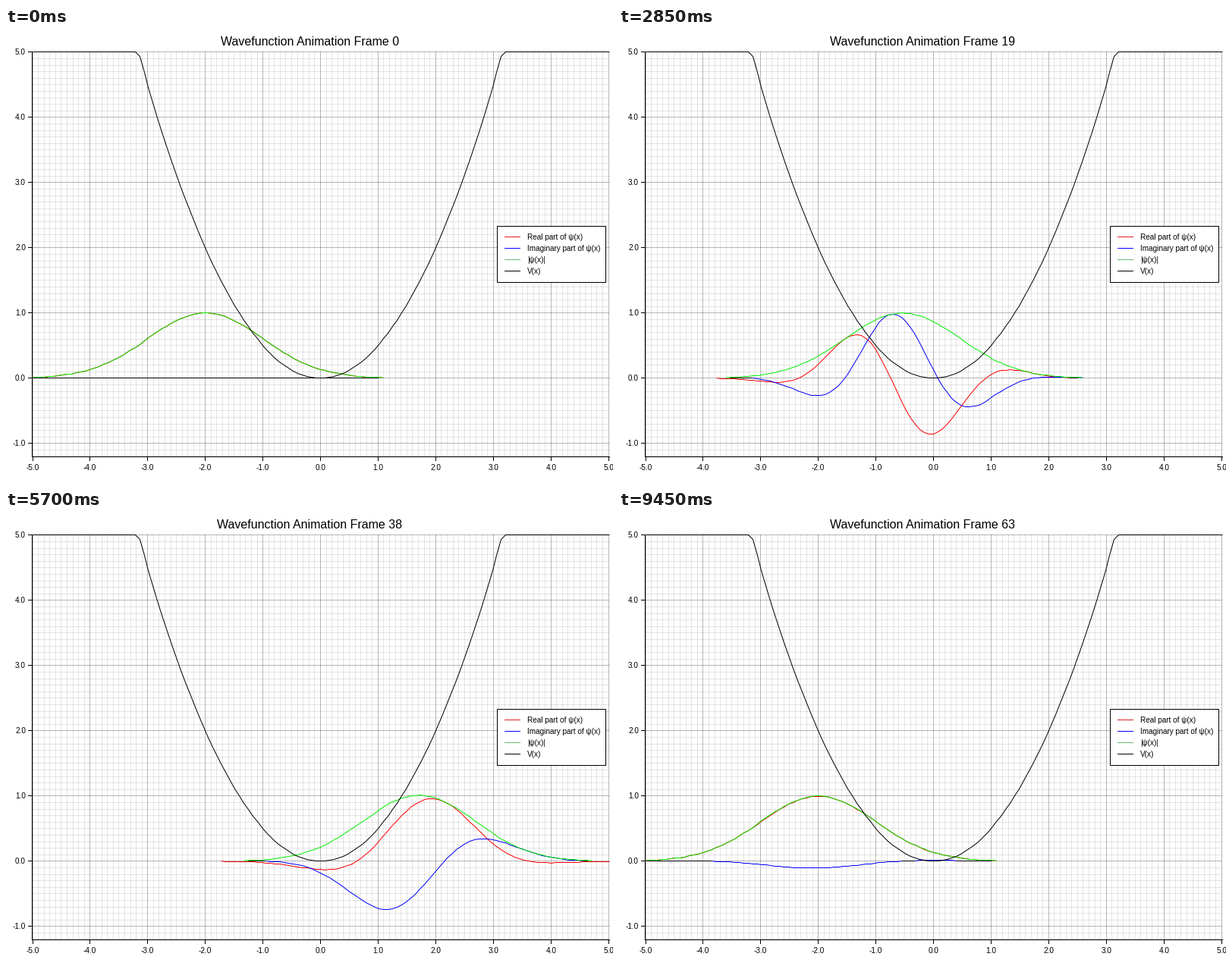
These frames come from a looping animation (800x600 px, 9.6 s). A matplotlib script:

```python
import numpy as np
import matplotlib.pyplot as plt
from matplotlib.animation import FuncAnimation

W, H, DPI = 800, 600, 100
PX = 72 / DPI
LEFT, RIGHT, TOP, BOTTOM = 35, 794, 31, 564
FRAMES, INTERVAL, DT = 64, 150, 0.4

plt.rcParams["font.family"] = ["Liberation Sans", "DejaVu Sans"]
plt.rcParams["path.simplify"] = False

fig = plt.figure(figsize=(W / DPI, H / DPI), dpi=DPI, facecolor="white")
ax = fig.add_axes([0, 0, 1, 1])
ax.set_xlim(0, W)
ax.set_ylim(H, 0)
ax.axis("off")


def col(x):
    """Pixel column of a data x."""
    px = LEFT + np.floor((RIGHT - LEFT) * (np.asarray(x) + 5) / 10 + 1e-6)
    return np.clip(px, LEFT, RIGHT + 1)


def row(y):
    """Pixel row of a data y."""
    scale = (BOTTOM - TOP) / 6.2
    return np.maximum(BOTTOM - np.floor(scale * (np.asarray(y) + 1.2) + 1e-6), TOP)


def line(xs, ys, color, z=2):
    """One pixel wide line through pixel centres."""
    return ax.plot(np.asarray(xs) + 0.5, np.asarray(ys) + 0.5, color=color, lw=PX,
                   zorder=z, snap=False, solid_capstyle="butt")[0]


def label(x, y, s, size=10, **kw):
    return ax.text(x, y, s, fontsize=size * PX, color="black", zorder=9, **kw)


# Mesh
def mesh(xs, ys, color, z):
    for x in col(xs):
        line([x, x], [TOP - 0.5, BOTTOM + 0.5], color, z)
    for y in row(ys):
        line([LEFT - 0.5, RIGHT + 0.5], [y, y], color, z)


mesh(np.arange(-50, 51) / 10, np.arange(-12, 51) / 10, (0, 0, 0, 0.1), 1)
mesh(np.arange(-5, 6), np.arange(-1, 6), (0, 0, 0, 0.2), 1.1)

# Axes, ticks and tick labels
line([34, 34], [30.5, 565.5], "black")
line([33.5, 795.5], [565, 565], "black")
for v in range(-5, 6):
    x = col(v)
    line([x, x], [565, 570.5], "black")
    label(x + 0.5, 583, f"{v:.1f}", ha="center", va="baseline", clip_on=True)
for v in range(-1, 6):
    y = row(v)
    line([28.5, 34], [y, y], "black")
    label(26, y + 4, f"{v:.1f}", ha="right", va="baseline")

# Harmonic oscillator on a finite-difference grid
dx = np.pi / 40
grid = np.arange(-128, 129) * dx
hop = np.full(len(grid) - 1, -0.5 / dx**2)
ham = np.diag(1 / dx**2 + grid**2 / 2) + np.diag(hop, 1) + np.diag(hop, -1)
energy, modes = np.linalg.eigh(ham)
coeff = modes.T @ np.exp(-(grid + 2) ** 2 / 2)
view = np.abs(grid) < 5.05
cols = col(grid[view])
ZERO = row(0)


def psi(t):
    return (modes @ (coeff * np.exp(-1j * energy * t)))[view]


def lift(rows):
    """Leave out the stretches that rest on the zero line."""
    flat = np.pad(rows == ZERO, 1, mode="edge")
    return np.where(flat[1:-1] & flat[:-2] & flat[2:], np.nan, rows)


GREEN = "#00ee00"
base = line(cols, cols * np.nan, "black", 3)
curves = [line(cols, cols * np.nan, c, 4 + i)
          for i, c in enumerate(["red", "blue", GREEN])]
line(cols, row(grid[view] ** 2 / 2), "black", 7)

# Legend
ax.add_patch(plt.Rectangle((647.5, 261.5), 143, 74, fc="white", ec="black",
                           lw=PX, zorder=8, snap=False))
entries = [("Real part of ψ(x)", "#e02020"), ("Imaginary part of ψ(x)", "blue"),
           ("|ψ(x)|", "#70b870"), ("V(x)", "black")]
for i, (name, color) in enumerate(entries):
    y = 275 + 15 * i
    line([656.5, 677.5], [y, y], color, 9)
    label(687, y + 4, name, va="baseline")

title = label(400.5, 23, "", 16, ha="center", va="baseline")


def update(n):
    p = psi(n * DT)
    rows = [row(v) for v in (p.real, p.imag, np.abs(p))]
    for curve, r in zip(curves, rows):
        curve.set_ydata(lift(r) + 0.5)
    resting = ((rows[0] == ZERO) | (rows[1] == ZERO)) & (rows[2] < ZERO)
    base.set_ydata(np.where(resting, ZERO + 0.5, np.nan))
    title.set_text(f"Wavefunction Animation Frame {n}")
    return [*curves, base, title]


anim = FuncAnimation(fig, update, frames=FRAMES, interval=INTERVAL,
                     repeat=True, repeat_delay=0)
plt.show()
```
